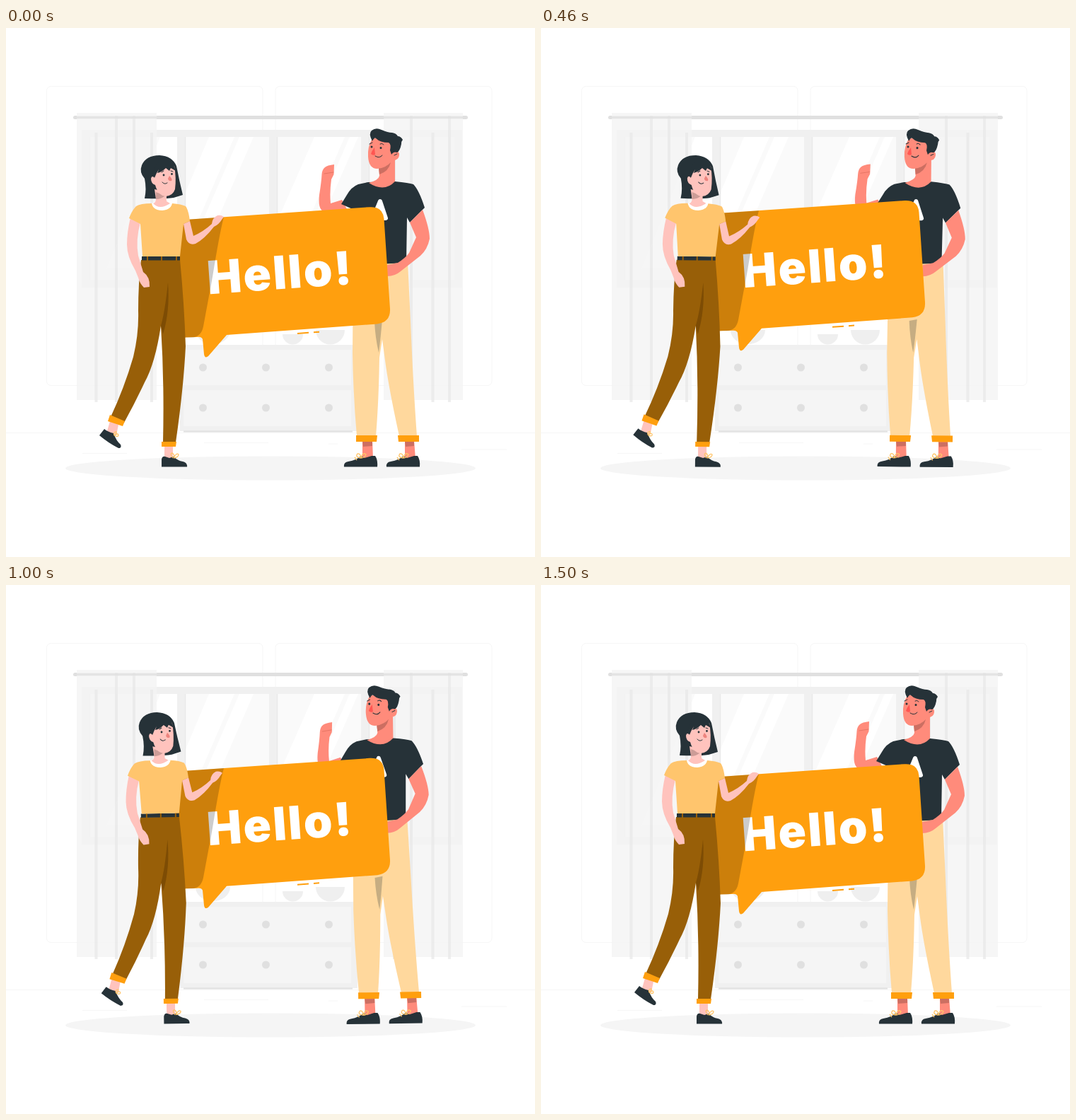
An HTML page that plays this animation: 748 px wide and 748 px high, repeating every 1540 ms.

```html
<!DOCTYPE html>
<html lang="en">
<head>
<meta charset="utf-8">
<title>Hello</title>
<style>
html, body { margin: 0; width: 100%; height: 100%; overflow: hidden; background: #fff; }
svg { display: block; width: 100%; height: 100%; }
text { font: 900 65px Inter, "Liberation Sans", sans-serif; letter-spacing: 2.5px; }
.dark { fill: #263238; }
.orange { fill: #ff9f0e; }
.line { fill: none; stroke: #263238; stroke-linecap: round; }
.lace { fill: none; stroke: #ffc56b; stroke-width: 1.3; }
.him { fill: #ff8b7b; }
.her { fill: #ffc3bd; }
</style>
</head>
<body>
<svg viewBox="0 0 748 748">
  <g id="room">
    <g fill="none" stroke="#f6f6f6">
      <rect x="57.500" y="82.500" width="305.500" height="423" rx="6"/>
      <rect x="381" y="82.500" width="306" height="423" rx="6"/>
      <path d="M0 572.500H748M280 586.500H371M456 588H469M644 596H708M108 601.500H171"/>
    </g>
    <path fill="#f0f0f0" d="M107 144H645V367H107Z"/>
    <path fill="#fafafa" d="M118 154H242V356H118ZM254 154H372V356H254ZM384 154H502V356H384ZM514 154H634V356H514Z"/>
    <path fill="#fff" d="M218 154H242V250L204 340H142ZM287 154H323L254 313V232ZM330 154H350L262 356H254V328ZM436 154H479L403 328H384V272ZM486 154H498L418 336H406Z"/>
    <path fill="none" stroke="#e9e9e9" stroke-width="1.500" d="M118.500 154V356M253.500 154V356M383.500 154V356M513.500 154V356"/>
    <rect x="95" y="124" width="558" height="5" rx="2.500" fill="#e0e0e0"/>
    <g fill="#f5f5f5" fill-opacity=".82">
      <path d="M100 120H213V526H100Z"/>
      <path d="M534 120H646V526H534Z"/>
    </g>
    <path fill="none" stroke="#e8e8e8" stroke-width="4" stroke-opacity=".75" d="M127.500 148V529M156 124V529M181 124V300M206 148V529M549 148V529M573 124V529M603.500 148V529M627 124V529"/>
    <path stroke="#e0e0e0" stroke-width="3" stroke-opacity=".7" d="M98 126.500H650"/>
    <path fill="#f0f0f0" d="M246 448H497V570H246Z"/>
    <path fill="#f5f5f5" d="M251 455H488V505H251ZM251 512H488V563H251Z"/>
    <path fill="#e0e0e0" d="M251 569.500H490V571.500H251Z"/>
    <path fill="#efefef" d="M268 427H317A24.500 20 0 0 1 268 427ZM391 433H420A14.500 14.500 0 0 1 391 433ZM438 427H479A20.500 20.500 0 0 1 438 427Z"/>
    <path stroke="#e0e0e0" stroke-width="11" stroke-linecap="round" d="M278.500 480h0M367.500 480h0M456.500 480h0M278.500 537h0M367.500 537h0M456.500 537h0"/>
    <ellipse cx="374" cy="622.500" rx="290" ry="17" fill="#f5f5f5"/>
  </g>

  <g id="man">
    <path class="him" d="M451 197Q454 194 464 193L463.500 207L460 214Q457.500 232 459 248L475 243L482 256Q460 263 448 259Q441 255 443 236Q446 217 446.500 207Q447 200 451 197Z"/>
    <path class="line" stroke-width=".8" style="stroke:#e0705f" d="M450 206L463 204"/>
    <path fill="#ffd89d" d="M491 330H568L572 415Q576 510 581 577H556Q541 508 536 470L532 440L528 466Q527 530 523 577H496Q491 520 490 460Z"/>
    <path fill="#c6ad82" d="M521 414L532 412Q529 446 527 459Q522 438 521 414Z"/>
    <path class="him" d="M504 583H518L519 609H504ZM564 583H577L579 609H564Z"/>
    <path fill="#cc6f62" d="M504 585H518V591L505 592ZM564 585H577V591L565 592Z"/>
    <path class="orange" d="M495 576H525L524 585H495ZM554 576H584V585H555Z"/>
    <g id="shoe">
      <path class="dark" d="M478 620.500Q477 614 484 613Q496 611 502 605L507 608L517 605H522Q526 611 525 620.500Z"/>
      <path class="lace" d="M502 608Q493 607 497 602Q501 601 502 608Q504 599 509 603Q508 607 502 608M496 611L493 607"/>
    </g>
    <use href="#shoe" x="60"/>
    <path class="dark" d="M512 218L498 221Q488 225 482 236L474 249L499 260L501 335L566 332L567 268L571 275L592 254Q584 229 576 221Q570 219 550 217Z"/>
    <path class="him" d="M571 275L589 257Q599 284 599 298Q596 313 586 322L558 344Q550 351 539 351V335L554 332Q565 325 570 318L580 296Z"/>
    <path fill="#fff" stroke="#fff" stroke-width="6" stroke-linejoin="round" d="M529 245L537 269H519Z"/>
    <path class="him" d="M527 194L528 209Q527 215 513 219Q535 233 550 217V180Z"/>
    <path fill="#cc6f62" d="M527 198Q538 197 544 190Q541 203 528 207Z"/>
    <path class="him" d="M518 156Q511 168 512 182Q513 199 525 199Q538 198 545 187Q555 188 556 180Q557 174 550 174L547 156Z"/>
    <path class="dark" d="M518 160Q512 149 517 145Q523 140 531 144Q540 148 546 148Q552 149 554 153Q558 153 561 158Q559 160 559 164Q557 174 553 176Q548 174 545 179L543 173Q545 164 541 162Q529 162 523 156Q521 154 518 160Z"/>
    <path fill="#ff5652" d="M521 169Q517 174 516 178Q519 181 522 179Z"/>
    <path class="line" stroke-width="3" d="M517 168v.1M530 169.500v.1"/>
    <path class="line" d="M514 164L518 162M529 164Q532 162 534 165M522 181Q528 185 532 180M549 180L553 178"/>
  </g>

  <g id="bubble">
    <path class="orange" d="M240 272L514 253.200Q533 252 534.500 270L543 397Q544 416 525 418.500L312 434L286 464Q281 468 280 461L278 440Q276 436 270 437L240 438Z"/>
    <path fill="none" stroke="#ff9f0e" stroke-width="2" d="M412 432L428 430.800M435 430.300L443 429.700"/>
    <text fill="#fff" transform="translate(286 376.500) rotate(-4.100)">Hello!</text>
    <path fill-opacity=".2" d="M240 272L308 267.300Q302 290 292 352L279 422Q276 437 263 437.500H240Z"/>
  </g>

  <g id="woman">
    <path fill="#985f08" d="M191 328H246Q252 390 254 450Q251 510 240 586H222Q224 500 219 421Q211 474 196 501Q183 529 167 558L148 550Q168 507 180 465Q188 432 187 400Q187 360 191 328Z"/>
    <path fill="#7d4c04" d="M229 360Q232 400 222 433L219 421Q225 400 229 360Z"/>
    <path class="her" d="M176 268L190 275Q183 300 187 322L194 345Q204 352 203 366L195 367Q189 361 187 353L183 343Q171 323 171 306Q171 289 176 268Z"/>
    <path class="dark" d="M192 323H246V328.500H192Z"/>
    <path stroke="#985f08" stroke-width="2" d="M200 322.500V329M220 322.500V329M241 322.500V329"/>
    <path class="her" d="M224 590H236V609H224ZM147 556L159 561L156 576L143 570Z"/>
    <path class="orange" d="M220 585H241L240 592H220ZM147 547L168 556L165 563L144 556Z"/>
    <path class="dark" d="M220 620.500V610Q221 605 225 606L231 608L237 606Q243 612 250 613Q257 615 256 620.500ZM132 576L139 567Q144 571 152 573Q156 584 162 589Q164 594 159 594Q145 587 132 576Z"/>
    <path class="lace" d="M236 608Q231 602 235 601Q239 603 237 608Q241 600 244 603Q244 607 237 608M153 576Q151 571 156 571Q156 575 153 576Q159 572 159 576Q158 579 153 576"/>
    <path fill="#ffc56d" d="M206 248Q190 248 184 252Q178 258 174 269L190 277L193 323H246L251 277L260 273Q258 257 254 252Q248 249 235 248Z"/>
    <path class="her" d="M251 277L260 273L265 294Q279 288 291 277Q292 268 299 265Q304 264 308 267L305 271Q301 278 294 281Q281 298 268 305Q259 308 255 299Z"/>
    <path fill="#fff" d="M206 248Q208 258 221 258Q233 257 235 248L228 246H211Z"/>
    <path class="dark" d="M196 241Q199 228 196 213Q188 204 192 194Q198 180 217 180Q235 181 241 195Q245 216 250 236L237 240Q226 242 196 241Z"/>
    <path class="her" d="M210 228L212 242Q212 247 208 248Q217 258 232 248L227 245V232Z"/>
    <path fill="#cc9c97" d="M212 232L225 237Q220 242 212 242Z"/>
    <path class="her" d="M209 209L216 196L238 195Q241 212 239 228Q236 237 226 238Q215 237 211 222Q205 220 205 213Q206 208 209 211Z"/>
    <path class="dark" d="M207 207Q212 190 218 189L236 190L240 202L233 198L231 202L226 198Q220 204 214 205L216 200Q212 206 210 212Z"/>
    <path fill="#ed847e" d="M231 209Q236 214 234 216Q230 217 229 213Z"/>
    <path class="line" stroke-width="2.800" d="M223 208v.1M234.500 206.500v.1"/>
    <path class="line" d="M220 204L223 202M233 202L236 203M221 218Q224 222 228 219"/>
  </g>
</svg>
<script>
const LOOP = 1540, FRAMES = 37, CYCLE = 36;
const [man, woman, bubble] = ["man", "woman", "bubble"].map(id => document.getElementById(id));

// Triangle wave from 0 to 1 and back
const triangle = p => 1 - Math.abs(1 - 2 * (p - Math.floor(p)));

function draw() {
  const frame = Math.floor(performance.now() % LOOP / LOOP * FRAMES);
  const phase = (frame + 1) / CYCLE;
  const lift = -15 * (triangle(phase) - 1 / 18);
  const sway = 2 * triangle(phase + .25) - 1 - 1 / 9;
  bubble.setAttribute("transform", `translate(0 ${lift})`);
  man.setAttribute("transform", `rotate(${sway} 520 381)`);
  woman.setAttribute("transform", `rotate(${sway} 220 400)`);
  requestAnimationFrame(draw);
}
draw();
</script>
</body>
</html>
```
